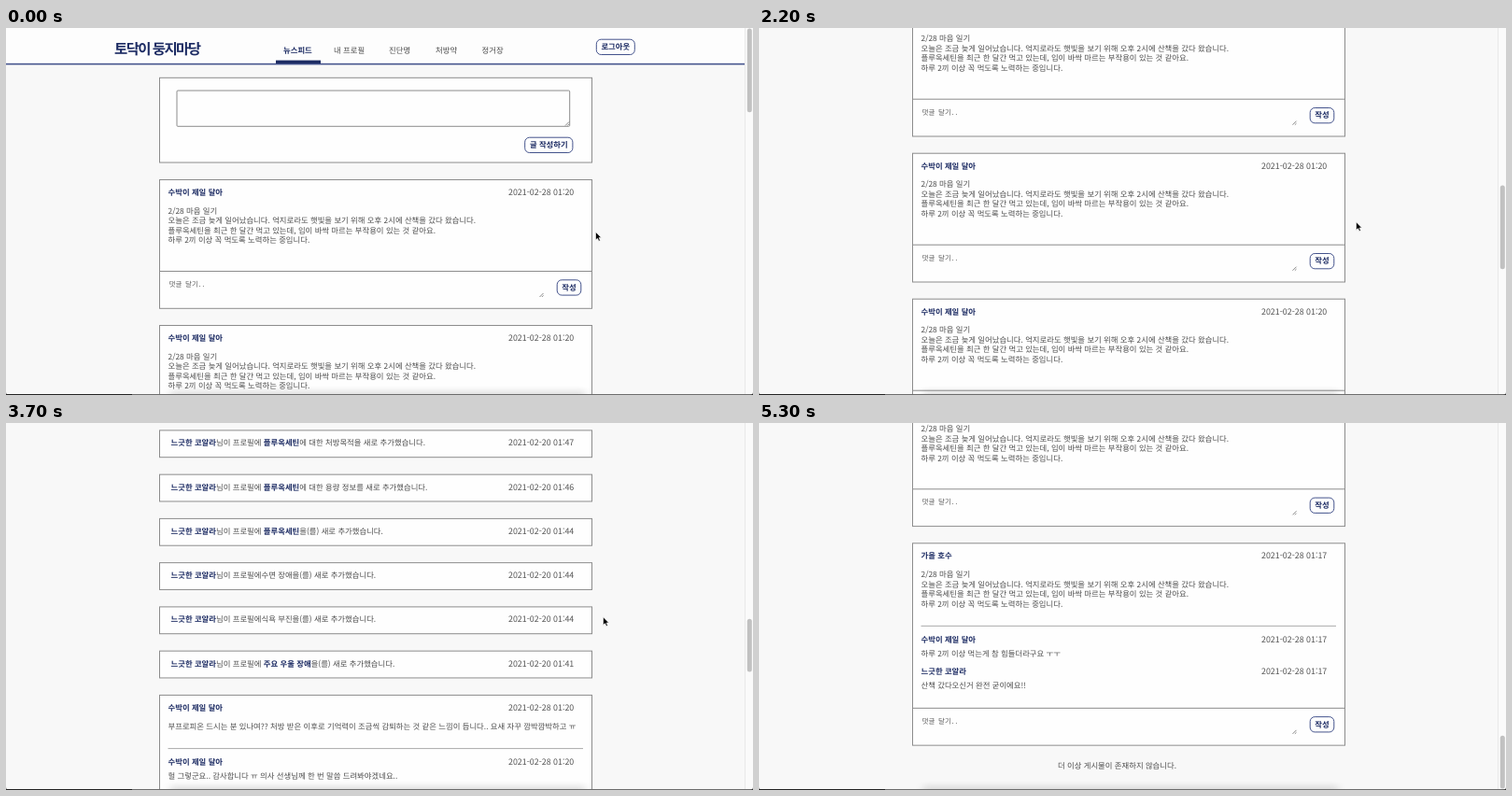
These frames come from a looping animation (800 px wide and 393 px high, 6000 ms). An HTML page:

```html
<!DOCTYPE html>
<html lang="ko">
<head>
<meta charset="utf-8">
<style>
  html, body { margin: 0; width: 100%; height: 100%; overflow: hidden; background: #f8f8f8; }
  svg { display: block; width: 100vw; height: 100vh; }
  text { font: 8.37px "Noto Sans CJK KR", "Noto Sans CJK", "Noto Sans", sans-serif; fill: #4c4c4c; text-rendering: geometricPrecision; white-space: pre; }
  .bold { font-weight: 700; fill: #1c2b63; }
  .date { font-size: 8.9px; fill: #555; }
  .hint { font: 7.5px "Noto Sans Mono CJK KR", "Noto Sans CJK KR", monospace; fill: #5c5c5c; }
  .title { font-size: 15.5px; font-weight: 900; letter-spacing: -1.6px; fill: #1c2b63; }
  .mid { text-anchor: middle; }
  .box { fill: #fefefe; stroke: #8c8c8c; }
  .rule { stroke: #8c8c8c; }
  .soft { stroke: #aaa; }
  .btn { fill: #fefefe; stroke: #44538c; }
  .grip { stroke: #555; stroke-width: .7; fill: none; }
</style>
</head>
<body>
<svg viewBox="0 0 800 393" preserveAspectRatio="none">
  <defs>
    <linearGradient id="shade" x2="0" y2="1">
      <stop offset="0" stop-color="#000" stop-opacity="0"/>
      <stop offset="1" stop-color="#000" stop-opacity=".13"/>
    </linearGradient>
    <filter id="blur" x="-5%" width="110%" y="-50%" height="200%"><feGaussianBlur stdDeviation="4 1"/></filter>
  </defs>
  <rect width="800" height="393" fill="#f8f8f8"/>
  <g id="page"></g>
  <rect x="176" y="384" width="444" height="10" fill="url(#shade)" filter="url(#blur)"/>
  <rect x="791.5" width="9" height="393" fill="#fafafa"/>
  <path d="M791.5 0V393" stroke="#e9e9e9"/>
  <rect id="thumb" x="793.8" width="5" rx="2.5" fill="#c1c1c1"/>
  <path d="M0 392.5H800" stroke="#6c6c6c"/>
  <path d="M0 392.5H135" stroke="#222"/>
  <path d="M0 390Q0 393 3 393H0ZM800 390Q800 393 797 393H800Z" fill="#222"/>
  <path id="cursor" d="M0 0V8.6L2 6.8L3.4 9.8L4.9 9.1L3.5 6.2H6.1Z" fill="#000" stroke="#fff" stroke-width=".6"/>
</svg>
<script>
const LOOP = 6000, STEP = 100, VIEW = 393, TRACK = 391;
const SHORT_PAGE = 1710, FULL_PAGE = 2716.5, LOAD_TIME = 2600, CURSOR_HIDE = 4700;

const CAT = '수박이 제일 달아', BIRD = '느긋한 코알라', LAKE = '가을 호수';
const DAY = '2021-02-28 ';
const DIARY = [
  '2/28 마음 일기',
  '오늘은 조금 늦게 일어났습니다. 억지로라도 햇빛을 보기 위해 오후 2시에 산책을 갔다 왔습니다.',
  '플루옥세틴을 최근 한 달간 먹고 있는데, 입이 바싹 마르는 부작용이 있는 것 같아요.',
  '하루 2끼 이상 꼭 먹도록 노력하는 중입니다.'
];
const plain = { name: CAT, time: '01:20', lines: DIARY };
const question = {
  name: CAT, time: '01:20',
  lines: ['부프로피온 드시는 분 있나여?? 처방 받은 이후로 기억력이 조금씩 감퇴하는 것 같은 느낌이 듭니다.. 요새 자꾸 깜박깜박하고 ㅠ'],
  replies: [
    [CAT, '헐 그렇군요.. 감사합니다 ㅠ 의사 선생님께 한 번 말씀 드려봐야겠네요..'],
    [BIRD, '저도 처음에 그랬는데 점점 괜찮아졌어요'],
    [LAKE, '병원에 한 번 여쭤보세요!']
  ]
};
const walk = {
  name: LAKE, time: '01:17', lines: DIARY,
  replies: [[CAT, '하루 2끼 이상 먹는게 참 힘들더라구요 ㅜㅜ'], [BIRD, '산책 갔다오신거 완전 굳이에요!!']]
};
const DRUG = '플루옥세틴';
const news = [
  [' ', DRUG, '에 대한 평가를', '47'],
  [' ', DRUG, '에 대한 처방목적을', '47'],
  [' ', DRUG, '에 대한 용량 정보를', '46'],
  [' ', DRUG, '을(를)', '44'],
  ['수면 장애', '', '을(를)', '44'],
  ['식욕 부진', '', '을(를)', '44'],
  [' ', '주요 우울 장애', '을(를)', '41']
];

const text = (x, y, s, cls = '') => `<text x="${x}" y="${y}" class="${cls}">${s}</text>`;
const rect = (x, y, w, h, cls, r = 0) => `<rect x="${x}" y="${y}" width="${w}" height="${h}" rx="${r}" class="${cls}"/>`;
const line = (x1, x2, y, cls) => `<path d="M${x1} ${y}H${x2}" class="${cls}"/>`;
const bold = s => `<tspan class="bold">${s}</tspan>`;
const grip = (x, y) => `<path d="M${x - 4} ${y}l4 -4M${x - 1.6} ${y}l1.6 -1.6" class="grip"/>`;
const button = (x, y, w, s) => rect(x, y, w, 16.3, 'btn', 5) + text(x + w / 2, y + 11, s, 'bold mid');
const group = (y, s) => `<g transform="translate(0 ${y})">${s}</g>`;
const heading = (y, name, time) => text(173.5, y, name, 'bold') + text(538, y, DAY + time, 'date');

function post({ name, time, lines, replies = [] }) {
  const split = 57.2 + (lines.length - 1) * 10.45;
  const bar = replies.length ? split + 18.6 + replies.length * 34.7 : 98;
  const height = bar + 39.8;
  let s = rect(164.5, 0, 463, height, 'box') + heading(16.7, name, time);
  lines.forEach((row, i) => s += text(173.5, 36.3 + i * 10.5, row));
  if (replies.length) s += line(173.5, 618, split, 'soft');
  replies.forEach(([who, words], i) => {
    const y = split + 17.3 + i * 34.7;
    s += heading(y, who, time) + text(173.5, y + 15, words);
  });
  s += line(164.5, 627.5, bar, 'rule') + text(174.5, bar + 16.7, '댓글 달기..', 'hint') +
    grip(575.5, bar + 27.5) + button(590.2, bar + 9.3, 25.6, '작성');
  return [s, height + 18.2];
}

function notice([gap, item, tail, minute]) {
  const words = `${bold(BIRD)}님이 프로필에${gap}${item && bold(item)}${tail} 새로 추가했습니다.`;
  return [rect(164.5, 0, 463, 28.8, 'box') + text(176.5, 16.6, words) +
    text(538, 16.6, '2021-02-20 01:' + minute, 'date'), 47.25];
}

function buildPage() {
  const tabs = [[351, '내 프로필'], [410, '진단명'], [460, '처방약'], [509.5, '정거장']];
  let s = '<rect width="792" height="38" fill="#fdfdfd"/>' +
    '<rect y="37.8" width="792" height="1.6" fill="#44538c"/>' +
    '<rect x="289" y="34.6" width="48" height="3.4" fill="#1c2b63"/>' +
    text(116, 28, '토닥이 둥지마당', 'title') + text(297, 27, '뉴스피드', 'bold') +
    tabs.map(([x, label]) => text(x, 27, label)).join('') +
    button(632.3, 12.2, 41, '로그아웃') +
    rect(164.5, 53.3, 463, 90.7, 'box') + rect(183, 67, 420.7, 38.3, 'box', 1) +
    grip(603, 104.5) + button(555.7, 117.2, 51.2, '글 작성하기');
  const items = [
    ...[plain, plain, question, plain, plain, plain, walk].map(post),
    ...news.map(notice),
    ...[question, plain, plain, plain, walk].map(post)
  ];
  let y = 162.5;
  for (const [markup, advance] of items) {
    s += group(y, markup);
    y += advance;
  }
  return s + text(383.5, y + 7, '더 이상 게시물이 존재하지 않습니다.', 'mid');
}

// Three flicks with momentum: [time, scroll offset]
const scrollKeys = [
  [1300, 0], [1400, 14], [1500, 61], [1600, 200], [1700, 360], [1800, 495], [1900, 595], [2000, 665],
  [2200, 734.2], [2400, 780], [2500, 930], [2600, 1110], [2700, 1255], [2800, 1345], [2900, 1398],
  [3000, 1420], [3100, 1427], [3500, 1434], [3600, 1440], [3700, 1454.3], [3800, 1650], [3900, 1900],
  [4000, 2090], [4100, 2217], [4200, 2282], [4300, 2312], [4400, 2322.8]
];

function sample(keys, t) {
  const i = keys.findIndex(k => k[0] > t);
  if (i === 0) return keys[0][1];
  if (i < 0) return keys[keys.length - 1][1];
  const [t0, a] = keys[i - 1], [t1, b] = keys[i];
  return a + (b - a) * (t - t0) / (t1 - t0);
}

const $ = id => document.getElementById(id);
const page = $('page'), thumb = $('thumb'), cursor = $('cursor');
page.innerHTML = buildPage();

function draw(now) {
  const t = Math.floor(now % LOOP / STEP) * STEP;
  const scroll = sample(scrollKeys, t);
  const scale = TRACK / (t < LOAD_TIME ? SHORT_PAGE : FULL_PAGE);
  page.setAttribute('transform', `translate(0 ${-scroll})`);
  thumb.setAttribute('y', 0.5 + scroll * scale);
  thumb.setAttribute('height', VIEW * scale);
  const move = sample([[200, 0], [700, 1]], t);
  cursor.setAttribute('transform', `translate(${631.5 + 8 * move} ${218.4 - 10.6 * move})`);
  cursor.setAttribute('visibility', t < CURSOR_HIDE ? 'visible' : 'hidden');
}

const start = performance.now();
(function tick() {
  draw(performance.now() - start);
  requestAnimationFrame(tick);
})();
</script>
</body>
</html>
```
